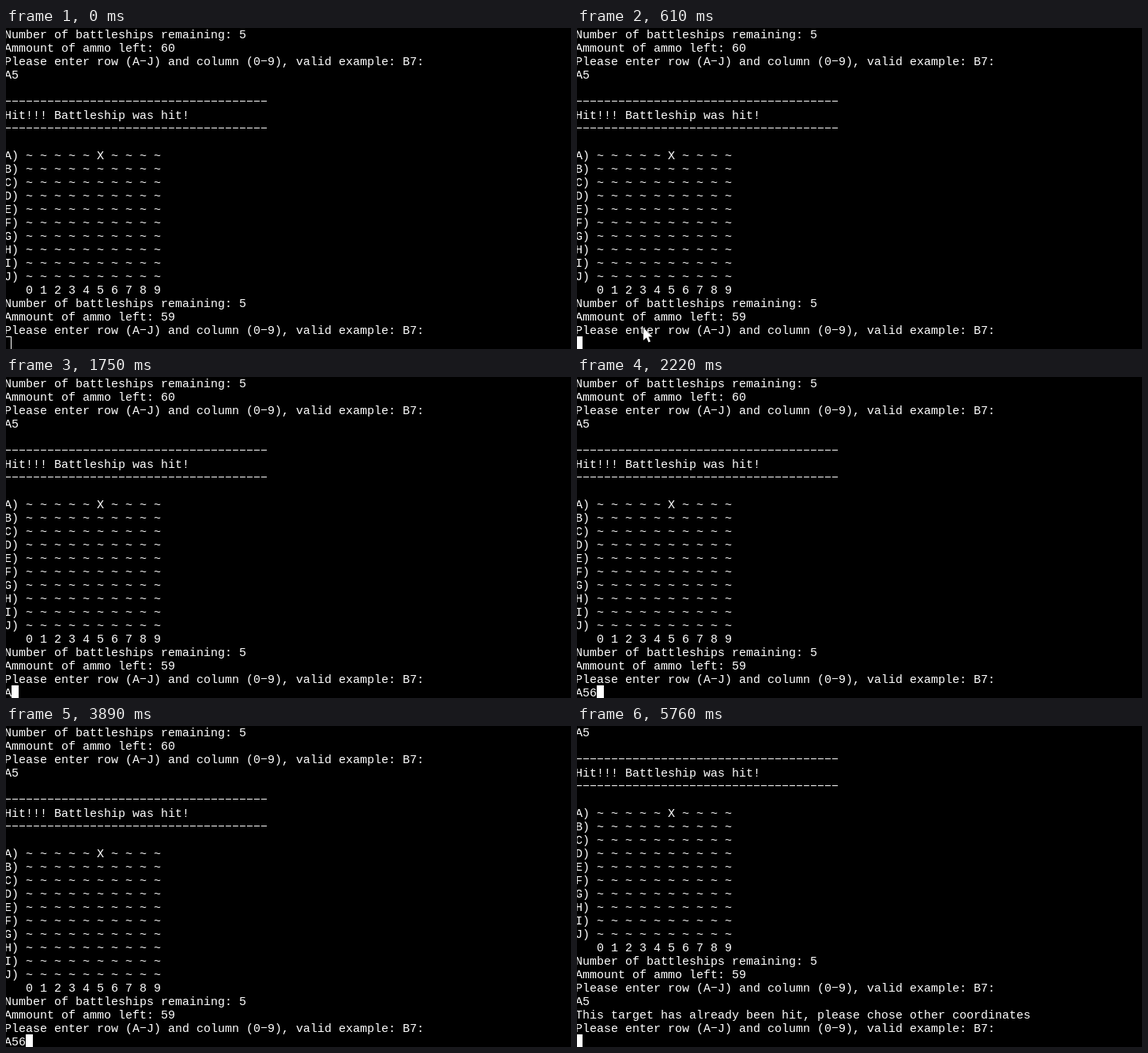
Write an HTML page that moves like this. It is 715x406 px and loops after 8 s.

```html
<!DOCTYPE html>
<html lang="en">
<head>
<meta charset="utf-8">
<title>Battleships terminal</title>
<style>
  html, body { margin: 0; width: 100%; height: 100%; overflow: hidden; background: #000; }
  #stage { position: relative; width: 715px; height: 406px; overflow: hidden; background: #000; }
  #screen {
    position: absolute; left: -2px; top: 1px; margin: 0; color: #fff;
    font: 15px/17px "Liberation Mono", "Courier New", monospace;
    font-variant-ligatures: none;
  }
  /* wide, thin hyphens */
  #screen i {
    display: inline-block; height: 17px; vertical-align: top; font-style: normal; color: transparent;
    background: linear-gradient(90deg, transparent 1px, #fff 1px 8px, transparent 8px) 0 6px / 9px 1px repeat-x;
  }
  #cursor {
    position: absolute; top: 390px; width: 9px; height: 17px;
    box-sizing: border-box; border: 1px solid #fff;
  }
  #pointer { position: absolute; left: 0; top: 0; overflow: visible; }
</style>
</head>
<body>
<div id="stage">
  <pre id="screen"></pre>
  <div id="cursor"></div>
  <svg id="pointer" width="13" height="20">
    <path d="M0 0V16L4 12.5L6.5 18.5L9 17.5L6.5 11.5H11.5Z" fill="#fff" stroke="#000" paint-order="stroke"/>
  </svg>
</div>
<script>
const LOOP = 8000, CELL = 9, LEFT = -2, ROWS = 24;
const FOCUS = 610, SUBMIT = 5760;

const rule = "-".repeat(37);
const prompt = "Please enter row (A-J) and column (0-9), valid example: B7:";
const status = ammo => ["Number of battleships remaining: 5", "Ammount of ammo left: " + ammo, prompt];
const board = [..."ABCDEFGHIJ"].map(r =>
  r + ") " + Array.from({ length: 10 }, (_, c) => r === "A" && c === 5 ? "X" : "~").join(" "));
const history = [
  ...status(60), "A5", "", rule, "Hit!!! Battleship was hit!", rule, "",
  ...board, "   0 1 2 3 4 5 6 7 8 9", ...status(59)
];
const reply = ["A5", "This target has already been hit, please chose other coordinates", prompt];

// [time, typed text]
const typing = [[0, ""], [1750, "A"], [2220, "A56"], [2290, "A566"], [3890, "A56"], [4090, "A5"], [SUBMIT, ""]];
// [time, x, y] of the mouse tip
const moves = [[260, 38, 404], [330, 44, 401], [400, 53, 396], [470, 66, 388],
               [540, 78, 380], [610, 84, 379], [680, 90, 393]];
const MOVE_END = 750;

const screen = document.getElementById("screen");
const cursor = document.getElementById("cursor");
const pointer = document.getElementById("pointer");
const stepAt = (table, t) => table.findLast(step => step[0] <= t);
let shown;

function draw(t) {
  const typed = stepAt(typing, t)[1];
  const lines = [...history, ...(t >= SUBMIT ? reply : []), typed].slice(-ROWS);
  const html = lines.join("\n").replace(/-+/g, "<i>$&</i>");
  if (html !== shown) screen.innerHTML = shown = html;

  cursor.style.left = LEFT + typed.length * CELL + "px";
  cursor.style.background = t >= FOCUS ? "#fff" : "none";

  const move = t < MOVE_END && stepAt(moves, t);
  pointer.style.display = move ? "block" : "none";
  if (move) pointer.style.transform = `translate(${move[1]}px, ${move[2]}px)`;
}

const start = performance.now();
function tick() {
  draw((performance.now() - start) % LOOP);
  requestAnimationFrame(tick);
}
tick();
</script>
</body>
</html>
```
